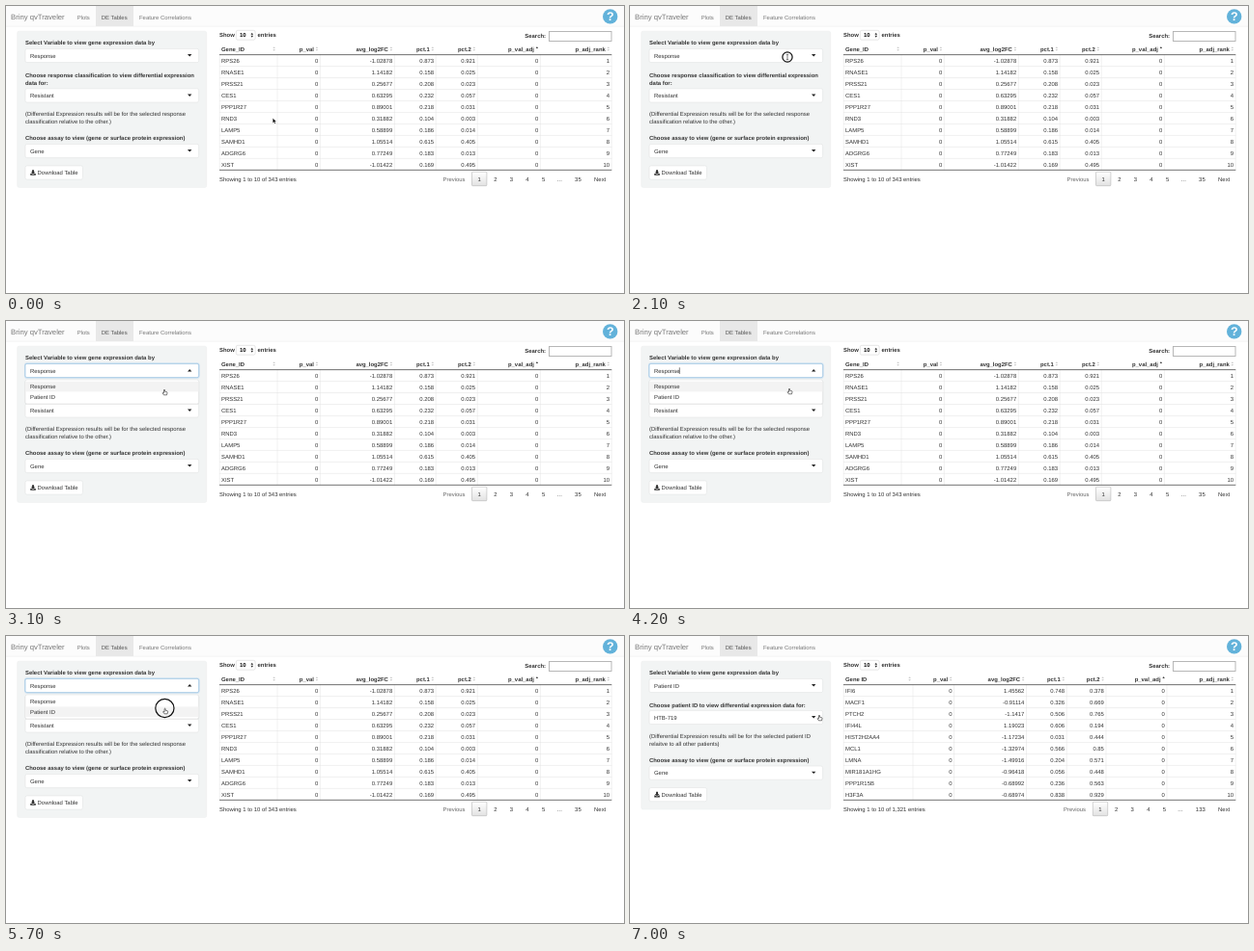
Animation, 640 px wide and 298 px high, one loop 8 s. Source, as an HTML page:

```html
<!DOCTYPE html>
<html lang="en">
<head>
<meta charset="utf-8">
<title>Gene expression tables</title>
<style>
  html, body { margin: 0; width: 100%; height: 100%; overflow: hidden; background: #fff; }
  svg { display: block; width: 640px; height: 298px; }
  text { font: 5.92px "Liberation Sans", Arial, sans-serif; fill: #333; text-rendering: geometricPrecision; white-space: pre; }
  .b { font-weight: 700; }
  .nav { fill: #777; }
  .field { fill: #fff; stroke: #dcdfdf; stroke-width: .5; }
  .grid { stroke: #e0e0e0; stroke-width: .5; fill: none; }
  .rule { stroke: #111; stroke-width: .6; }
</style>
</head>
<body>
<svg viewBox="0 0 640 298">
  <defs>
    <linearGradient id="page" x2="0" y2="1">
      <stop offset="0" stop-color="#fff"/><stop offset="1" stop-color="#e2e2e2"/>
    </linearGradient>
  </defs>
  <g id="base"></g>
  <g id="response"></g>
  <g id="patient"></g>
  <g id="menu"></g>
  <path id="caret" d="M51.3 48.3V55" stroke="#222" stroke-width=".6"/>
  <g id="cursor" stroke-linejoin="round">
    <path id="arrow" d="M0 0V4.9L1.2 3.9L2 5.6L2.9 5.2L2.1 3.5H3.6Z" fill="#000" stroke="#fff" stroke-width=".3"/>
    <path id="beam" d="M-1.2 -2.8Q0 -2.8 0 -2V2Q0 2.8 -1.2 2.8M1.2 -2.8Q0 -2.8 0 -2M0 2Q0 2.8 1.2 2.8" fill="none" stroke="#222" stroke-width=".6"/>
    <path id="hand" d="M-.5 .5Q0 -.2 .5 .5V2.2L2.6 2.7Q3.1 2.9 3 3.6L2.5 5.8H-.6L-2 3.7Q-1.8 2.9 -.5 3.8Z" fill="#fff" stroke="#222" stroke-width=".6"/>
  </g>
  <circle id="ring" fill="none" stroke="#111" stroke-width="1.2"/>
</svg>
<script>
const $ = id => document.getElementById(id);

const text = (x, y, s, attrs = '') => `<text x="${x}" y="${y + 2.1}" ${attrs}>${s}</text>`;
const bold = (x, y, s, attrs = '') => text(x, y, s, `class="b" ${attrs}`);
const rect = (x, y, w, h, attrs) => `<rect x="${x}" y="${y}" width="${w}" height="${h}" ${attrs}/>`;
const tri = (x, y, w, h, fill = '#222') =>
  `<path d="M${x - w / 2} ${y - h / 2}h${w}l${-w / 2} ${h}z" fill="${fill}"/>`;
const RIGHT = 'text-anchor="end"';
const MID = 'text-anchor="middle"';

const select = (y, value) =>
  rect(20, y - 7.1, 179.6, 14.2, 'class="field" rx="1.7"') + text(25, y, value) + tri(190.2, y - .2, 4.4, 2.4);

const button = y =>
  rect(20, y - 7.1, 59.5, 14.2, 'class="field" rx="1.7"') +
  `<path d="M27 ${y - 2.8}h2v2.2h1.4l-2.4 2.3l-2.4 -2.3h1.4zM25.2 ${y + 1}h1.2l1.6 1.2l1.6 -1.2h1.2v1.8h-5.6z" fill="#333"/>` +
  text(32.6, y, 'Download Table');

const HEADS = ['p_val', 'avg_log2FC', 'pct.1', 'pct.2', 'p_val_adj', 'p_adj_rank'];
const TOP = 50.6, ROW = 11.97;

function sortIcon(x, active) {
  return active
    ? tri(x, 43, 2.4, -1.8, '#444')
    : tri(x, 43.2, 2.6, -1.7, '#ccc') + tri(x, 45.9, 2.6, 1.7, '#ccc');
}

function table(idHead, edges, data) {
  const rows = data.trim().split(/\s*\n\s*/).map(r => r.split(' '));
  const bottom = TOP + ROW * rows.length;
  let out = bold(223, 44.6, idHead) + sortIcon(edges[0] - 3.4);
  HEADS.forEach((h, i) => {
    const x = edges[i + 1];
    out += bold(x - 6.4, 44.6, h, RIGHT) + sortIcon(x - 3.4, h === 'p_val_adj');
  });
  rows.forEach(([gene, fc, p1, p2], r) => {
    const y = TOP + ROW * (r + .53);
    out += text(223, y, gene);
    [0, fc, p1, p2, 0, r + 1].forEach((v, i) => out += text(edges[i + 1] - 2.1, y, v, RIGHT));
    if (r) out += `<path class="grid" d="M221 ${TOP + ROW * r}H627.3"/>`;
  });
  for (const x of [221.2, ...edges]) out += `<path class="grid" d="M${x} ${TOP}V${bottom}"/>`;
  return out + `<path class="rule" d="M221 ${TOP}H627.3M221 ${bottom}H627.3"/>`;
}

function pager(total, prev, first, lastX, last) {
  let out = text(221, 179.9, `Showing 1 to 10 of ${total} entries`) +
    text(prev, 179.9, 'Previous', `${MID} style="fill:#666"`) +
    rect(first - 7.7, 172.2, 15.4, 14.5, 'rx=".8" fill="url(#page)" stroke="#a8a8a8" stroke-width=".5"');
  ['1', '2', '3', '4', '5', '…'].forEach((s, i) => out += text(first + 16.6 * i, 179.9, s, MID));
  return out + text(lastX, 179.9, last, MID) + text(615.2, 179.9, 'Next', MID);
}

const well = h => rect(11.7, 26.2, 196, h, 'rx="1.7" fill="#f2f4f4" stroke="#eaecec" stroke-width=".5"') +
  bold(20, 38.2, 'Select Variable to view gene expression data by');
const ASSAY = 'Choose assay to view (gene or surface protein expression)';

$('base').innerHTML =
  rect(0, 0, 640, 21, 'fill="#fcfcfc"') + rect(0, 20.8, 640, .5, 'fill="#e8e8e8"') +
  rect(93, 0, 39, 21, 'fill="#e8e8e8"') +
  text(5, 11.7, 'Briny qvTraveler', 'class="nav" style="font-size:7.7px"') +
  text(73.7, 11.5, 'Plots', 'class="nav"') +
  text(98.8, 11.5, 'DE Tables', 'style="fill:#555"') +
  text(138, 11.5, 'Feature Correlations', 'class="nav"') +
  '<circle cx="625.7" cy="10.9" r="7.7" fill="#62b2da"/>' +
  bold(625.7, 13, '?', `${MID} style="font-size:12.5px;fill:#fff"`) +
  bold(221, 30.2, 'Show') +
  rect(238.3, 25.3, 19.8, 9.8, 'rx="1.6" fill="#fff" stroke="#ccc" stroke-width=".5"') +
  bold(242, 30.2, '10', 'style="fill:#111"') + tri(254.8, 28.7, 2.5, -2) + tri(254.8, 31.8, 2.5, 2) +
  bold(260.5, 30.2, 'entries') +
  bold(559, 31.2, 'Search:', RIGHT) +
  rect(562.5, 26.5, 64.5, 10, 'fill="#fff" stroke="#b0b0b0" stroke-width=".9"');

$('response').innerHTML = well(162.2) + select(51.5, 'Response') +
  bold(20, 71.5, 'Choose response classification to view differential expression') +
  bold(20, 79.6, 'data for:') + select(92.9, 'Resistant') +
  text(20, 112, '(Differential Expression results will be for the selected response') +
  text(20, 120.2, 'classification relative to the other.)') +
  bold(20, 137.2, ASSAY) + select(150.5, 'Gene') + button(173) +
  table('Gene_ID', [281, 325.3, 402.3, 445.2, 488.2, 553.3, 627.2], `
    RPS26 -1.02878 0.873 0.921
    RNASE1 1.14182 0.158 0.025
    PRSS21 0.25677 0.208 0.023
    CES1 0.63295 0.232 0.057
    PPP1R27 0.89001 0.218 0.031
    RND3 0.31882 0.104 0.003
    LAMP5 0.58899 0.186 0.014
    SAMHD1 1.05514 0.615 0.405
    ADGRG6 0.77249 0.183 0.013
    XIST -1.01422 0.169 0.495`) +
  pager('343', 464, 490.2, 592.4, '35');

$('patient').innerHTML = well(153.8) + select(51.5, 'Patient ID') +
  bold(20, 71.5, 'Choose patient ID to view differential expression data for:') +
  select(84.5, 'HTB-719') +
  text(20, 103.7, '(Differential Expression results will be for the selected patient ID') +
  text(20, 112, 'relaitve to all other patients)') +
  bold(20, 128.8, ASSAY) + select(142.1, 'Gene') + button(164.6) +
  table('Gene ID', [293, 335.6, 410.5, 452.2, 493, 556, 627.2], `
    IFI6 1.45562 0.748 0.378
    MACF1 -0.91114 0.326 0.669
    PTCH2 -1.1417 0.506 0.765
    IFI44L 1.19023 0.606 0.194
    HIST2H2AA4 -1.17234 0.031 0.444
    MCL1 -1.32974 0.566 0.85
    LMNA -1.49916 0.204 0.571
    MIR181A1HG -0.96418 0.056 0.448
    PPP1R15B -0.68992 0.236 0.563
    H3F3A -0.68974 0.838 0.929`) +
  pager('1,321', 460.6, 487, 590.8, '133');

$('menu').innerHTML =
  rect(20, 44.4, 179.6, 14.2, 'rx="1.7" fill="none" stroke="#66afe9" stroke-opacity=".25" stroke-width="2.2"') +
  rect(20, 44.4, 179.6, 14.2, 'rx="1.7" fill="#fff" stroke="#8fbcdf" stroke-width=".6"') +
  text(25, 51.5, 'Response') + tri(190.2, 51.3, 4.4, -2.4) +
  rect(19.6, 61.6, 180.6, 25.2, 'rx="1.7" fill="#000" fill-opacity=".07"') +
  rect(20, 61, 179.6, 24.9, 'rx="1.7" class="field"') +
  rect(20.3, 62.8, 179, 10.6, 'id="mark" fill="#f3f3f3"') +
  text(25, 68, 'Response') + text(25, 78.4, 'Patient ID');

// time, x, y, pointer shape
const PATH = [
  [0, 276.3, 116.6, 'arrow'], [600, 276.3, 116.6, 'arrow'], [1500, 165.3, 55.3, 'arrow'],
  [1600, 164, 56, 'beam'], [1700, 163.6, 55.8, 'beam'], [1900, 163.6, 55.8, 'beam'],
  [2000, 163, 53, 'beam'], [2600, 163, 53, 'beam'], [2700, 163.4, 57, 'hand'],
  [3100, 164, 71, 'hand'], [3200, 164, 75, 'hand'], [3300, 164, 75, 'hand'],
  [3500, 165, 70, 'hand'], [4200, 165, 70, 'hand'], [4500, 164.6, 75, 'hand'],
  [5700, 164.6, 75, 'hand'], [5800, 164.4, 75, 'arrow'], [6300, 164.4, 75, 'arrow'],
  [6400, 164.7, 75.2, 'arrow'], [6700, 164.7, 75.2, 'arrow'], [7000, 196, 82, 'hand'],
  [8000, 196, 82, 'hand']
];

const ease = p => p * p * (3 - 2 * p);
const show = (id, on) => $(id).style.display = on ? '' : 'none';

function pointerAt(t) {
  const i = PATH.findIndex(k => k[0] > t) - 1;
  const [t0, x0, y0, shape] = PATH[i], [t1, x1, y1] = PATH[i + 1];
  const p = ease((t - t0) / (t1 - t0));
  return { x: x0 + (x1 - x0) * p, y: y0 + (y1 - y0) * p, shape };
}

function ringAt(t) {
  if (t === 2000) return [163, 53, 9.3];
  if (t === 2100) return [163, 53, 5.1];
  if (t === 5700) return [164.4, 75, 9.6];
}

function draw(t) {
  const open = t >= 2200 && t < 5800;
  show('response', t < 5800);
  show('patient', t >= 5800);
  show('menu', open);
  show('caret', open && Math.floor((t - 2200) / 500) % 2 === 0);

  const second = (t >= 3200 && t < 3500) || t >= 4300;
  $('mark').setAttribute('y', second ? 73.4 : 62.8);

  const { x, y, shape } = pointerAt(t);
  $('cursor').setAttribute('transform', `translate(${x} ${y})`);
  for (const s of ['arrow', 'beam', 'hand']) show(s, s === shape);

  const ring = ringAt(t);
  show('ring', ring);
  if (ring) ['cx', 'cy', 'r'].forEach((a, i) => $('ring').setAttribute(a, ring[i]));
}

const LOOP = 8000, STEP = 100;
const start = performance.now();
function tick() {
  const t = (performance.now() - start) % LOOP;
  draw(Math.floor(t / STEP) * STEP);
  requestAnimationFrame(tick);
}
tick();
</script>
</body>
</html>
```
